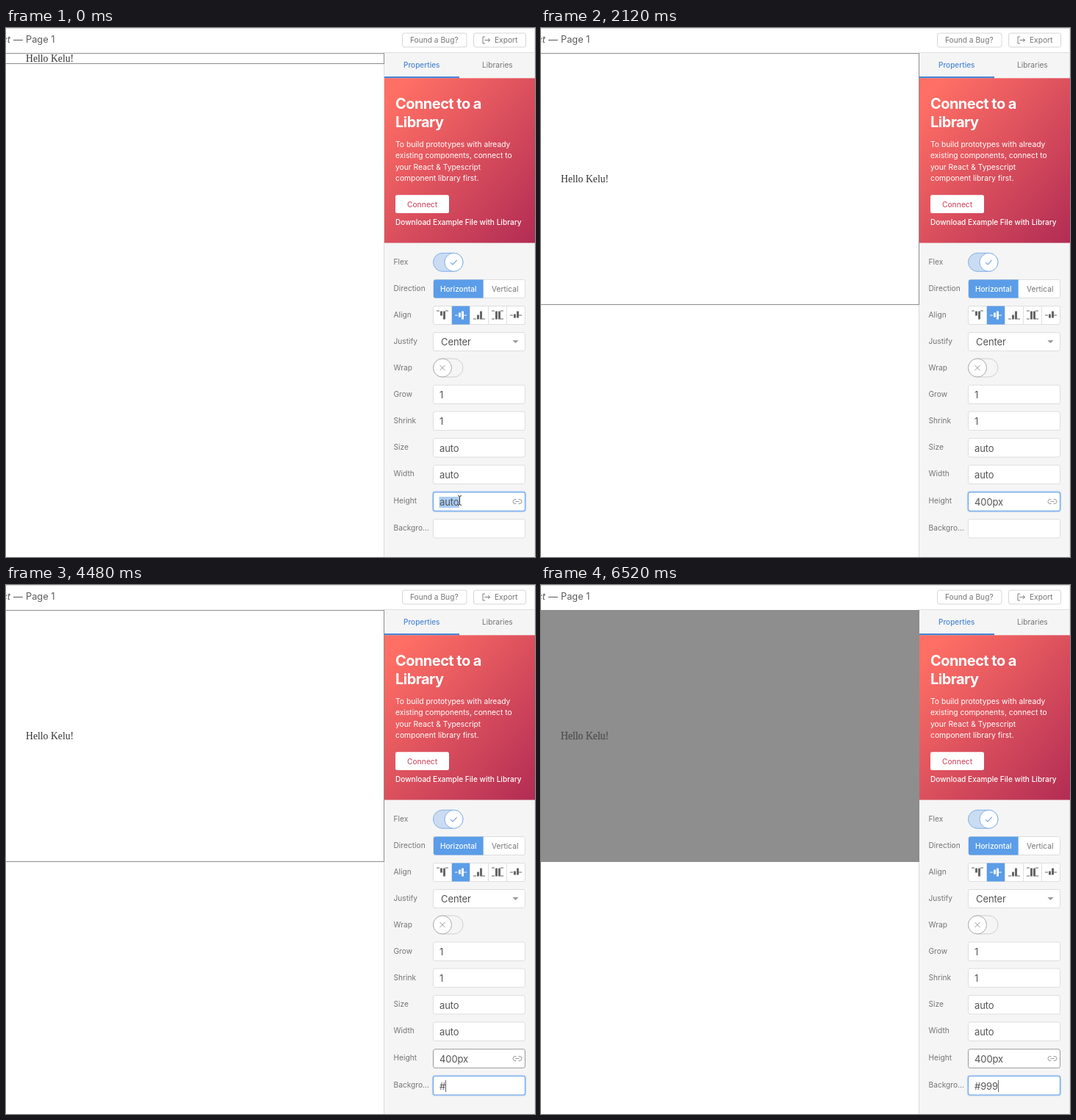
Write an HTML page that moves like this. It is 720x720 px and loops after 6560 ms.

```html
<!DOCTYPE html>
<html lang="en">
<head>
<meta charset="utf-8">
<title>Property panel</title>
<style>
  html, body { margin: 0; width: 100%; height: 100%; overflow: hidden; background: #fff; }
  svg { display: block; width: 720px; height: 720px; }
  text { font: 10.2px Inter, "Open Sans", sans-serif; fill: #747474; white-space: pre; }
  .medium { font-weight: 500; }
  .white { fill: #fff; }
  .blue { fill: #4a86d4; }
  .title { font-size: 20px; font-weight: 700; letter-spacing: -.55px; fill: #fff; }
  .copy { font-size: 10.3px; fill: #fff; }
  .page { font-size: 12.8px; fill: #5c5c5c; }
  .value { font-size: 13px; letter-spacing: -.1px; fill: #555; }
  .hello { font: 13.72px "Liberation Serif", "Times New Roman", serif; fill: #333; }
  .box { fill: #fff; stroke: #dedede; }
  .focus { stroke: #72a9ea; stroke-width: 1.2; filter: drop-shadow(0 0 .8px #72a9ea); }
  .hover { stroke: #999; }
  .line { fill: none; stroke: #808080; }
</style>
</head>
<body>
<svg viewBox="0 0 720 720">
  <defs>
    <linearGradient id="warm" x1="0" y1="0" x2="1" y2="1">
      <stop offset=".08" stop-color="#ff6f65"/>
      <stop offset="1" stop-color="#b22c54"/>
    </linearGradient>
  </defs>
  <rect width="720" height="720" fill="#fff"/>

  <!-- header -->
  <path d="M0 .5H720" stroke="#dcdcdc"/>
  <path d="M514 33.5H720" stroke="#dedede"/>
  <text class="page" x="6" y="20.3" text-anchor="end" style="font-style:italic">Project</text>
  <text class="page" x="10" y="20.3">—</text>
  <text class="page" x="27" y="20.3">Page 1</text>
  <g fill="#fff" stroke="#d6d6d6">
    <rect x="539.5" y="7" width="87.5" height="19" rx="3"/>
    <rect x="636.5" y="7" width="71" height="19" rx="3"/>
  </g>
  <text x="550" y="20.2">Found a Bug?</text>
  <text x="665" y="20.2">Export</text>
  <path class="line" d="M652 12H649V21H652M651.5 16.5H658.5M656 14L658.5 16.5L656 19"/>

  <!-- panel -->
  <rect x="515" y="34" width="205" height="686" fill="#f5f5f5"/>
  <path d="M514.5 34V720" stroke="#dcdcdc"/>
  <rect id="artboard" x="-5" y="34.5" width="519.5" height="14"/>
  <text id="hello" class="hello" x="27">Hello Kelu!</text>

  <text class="blue medium" x="541" y="53.8" style="font-size:10px">Properties</text>
  <text x="648" y="53.8">Libraries</text>
  <rect x="515" y="66" width="102" height="2.5" fill="#4686d8"/>
  <rect x="515" y="68.3" width="205" height="224.2" fill="url(#warm)"/>
  <g id="promo"></g>
  <rect x="530" y="227.3" width="73" height="24.7" rx="2.5" fill="#fff"/>
  <text class="medium" x="546" y="244.2" style="fill:#d2546a">Connect</text>
  <text class="white medium" x="530" y="268.2" style="font-size:10.1px">Download Example File with Library</text>

  <g id="fields"></g>

  <!-- toggles -->
  <g stroke="#83b0e8">
    <rect x="581.5" y="306.3" width="40.5" height="25" rx="12.5" fill="#cadcf2"/>
    <circle cx="609.5" cy="318.8" r="12.5" fill="#fff"/>
    <path d="M605 319.2L608 322L613.8 315.8" fill="none" stroke="#77a5df" stroke-width="1.1"/>
  </g>
  <g stroke="#cfcfcf">
    <rect x="581.5" y="450" width="40.5" height="25" rx="12.5" fill="#f5f5f5"/>
    <circle cx="594" cy="462.5" r="12.5" fill="#fff" stroke="#aaa"/>
    <path d="M590.5 459L597.5 466M597.5 459L590.5 466" stroke="#999"/>
  </g>

  <!-- direction -->
  <rect class="box" x="581.5" y="342.5" width="125" height="25" rx="2.5"/>
  <path d="M649.7 342.5H584.5Q582 342.5 582 345V365Q582 367.5 584.5 367.5H649.7Z" fill="#5b9de8"/>
  <text class="white medium" x="591" y="359" style="font-size:10.1px">Horizontal</text>
  <text x="661" y="359">Vertical</text>

  <!-- align -->
  <rect class="box" x="581.5" y="378.5" width="125" height="25" rx="2.5"/>
  <path d="M606.5 379V403M631.5 379V403M656.5 379V403M681.5 379V403" stroke="#dedede"/>
  <rect x="607" y="378.5" width="24" height="25" fill="#5b9de8"/>
  <g id="icons"></g>

  <!-- justify -->
  <rect class="box" x="581.5" y="414.5" width="125" height="25" rx="2.5"/>
  <text class="value" x="592" y="431.8">Center</text>
  <path d="M689.5 425H697.5L693.5 429Z" fill="#999"/>

  <!-- edited values -->
  <g id="edited"></g>
  <rect id="mark" x="589.5" y="638" width="27.5" height="15" fill="#a9cdf5"/>
  <text id="height" class="value" x="590" y="650.3"></text>
  <text id="color" class="value" x="590" y="687"></text>
  <path id="caret" d="M.5 0V16" stroke="#666"/>
  <path id="beam" class="line" d="M615 636.5Q617.5 636.5 617.5 638.5Q617.5 636.5 620 636.5M617.5 638V647.5M615 649.5Q617.5 649.5 617.5 647.5Q617.5 649.5 620 649.5" style="stroke:#333"/>
  <path class="line" d="M694.5 641.5H693A3 3 0 0 0 693 647.5H694.5M697.5 641.5H699A3 3 0 0 1 699 647.5H697.5M693.5 644.5H698.5" style="stroke:#999"/>
  <path d="M719.5 0V68M719.5 293V720" stroke="#e2e2e2"/>
</svg>
<script>
const LOOP = 6560;
const $ = id => document.getElementById(id);

function add(parent, tag, attrs, content = '') {
  const el = document.createElementNS('http://www.w3.org/2000/svg', tag);
  for (const key in attrs) el.setAttribute(key, attrs[key]);
  el.textContent = content;
  $(parent).append(el);
  return el;
}

['Connect to a', 'Library'].forEach((line, i) =>
  add('promo', 'text', { class: 'title', x: 530, y: 109.5 + 25.7 * i }, line));
['To build prototypes with already', 'existing components, connect to',
 'your React & Typescript', 'component library first.'].forEach((line, i) =>
  add('promo', 'text', { class: 'copy', x: 530, y: 161.8 + 15.4 * i }, line));

['Flex', 'Direction', 'Align', 'Justify', 'Wrap', 'Grow', 'Shrink', 'Size',
 'Width', 'Height', 'Backgro...'].forEach((name, i) =>
  add('fields', 'text', { x: 527.5, y: 321.5 + 36 * i + Math.max(0, i - 7) * .7 }, name));

const input = (parent, y) => add(parent, 'rect',
  { class: 'box', x: 581.5, y, width: 125, height: 25.5, rx: 2.5 });
[['1', 486], ['1', 522], ['auto', 558.5], ['auto', 595]].forEach(([value, y]) => {
  input('fields', y);
  add('fields', 'text', { class: 'value', x: 590, y: y + 18.2 }, value);
});
const heightBox = input('edited', 631.8);
const colorBox = input('edited', 668.5);

// Per icon: rows of the outer dashes, then [top, height] of the left and right bar
const icons = [
  [[-6], [-5, 6], [-5, 11]],
  [[0], [-3, 6], [-5, 11]],
  [[5], [0, 6], [-5, 11]],
  [[-6, 5], [-5, 11], [-5, 11]],
  [[0], [-1, 5], [-5, 9]]
];
icons.forEach(([dashes, ...bars], i) => {
  const part = (x, y, width, height) => add('icons', 'rect',
    { x: 594 + 25 * i + x, y: 390.5 + y, width, height, fill: i === 1 ? '#fff' : '#666' });
  dashes.forEach(y => [-8, 4].forEach(x => part(x, y, 4, 1)));
  bars.forEach(([y, height], side) => part(side ? 1 : -3, y, 3, height));
});

const heightKeys = [[0, 'auto'], [520, '4'], [760, '40'], [920, '400'], [1160, '400p'], [1400, '400px']];
const colorKeys = [[2300, ''], [4300, '#'], [4880, '#9'], [5040, '#99'], [5200, '#999']];
const last = (keys, t) => keys.filter(key => key[0] <= t).pop();
const show = (el, on) => el.setAttribute('visibility', on ? 'visible' : 'hidden');

function draw(t) {
  const onColor = t >= 2300;
  const [typedAt, text] = last(onColor ? colorKeys : heightKeys, t);
  const field = onColor ? $('color') : $('height');
  const fresh = t < heightKeys[1][0];
  const tall = t >= 1440;
  const grey = t >= 5240;

  $('height').textContent = last(heightKeys, t)[1];
  $('color').textContent = onColor ? text : '';
  heightBox.setAttribute('class', 'box ' + (onColor ? 'hover' : 'focus'));
  colorBox.setAttribute('class', 'box ' + (onColor ? 'focus' : ''));

  show($('mark'), fresh);
  show($('beam'), fresh);
  show($('caret'), !fresh && (t - typedAt) % 1000 < 500);
  const width = text ? field.getComputedTextLength() : 0;
  $('caret').setAttribute('transform', `translate(${Math.round(590 + width - .5)} ${onColor ? 674 : 637})`);

  const board = $('artboard');
  board.setAttribute('height', tall ? 342 : 14);
  board.setAttribute('fill', grey ? '#8e8e8e' : '#fff');
  board.setAttribute('stroke', '#8e8e8e');
  const hello = $('hello');
  hello.setAttribute('y', tall ? 210 : 46);
  hello.style.fill = grey ? '#515151' : '';
  hello.style.stroke = grey ? '#515151' : 'none';
  hello.style.strokeWidth = .3;
}

const start = performance.now();
function tick() {
  draw((performance.now() - start) % LOOP);
  requestAnimationFrame(tick);
}
tick();
</script>
</body>
</html>
```
